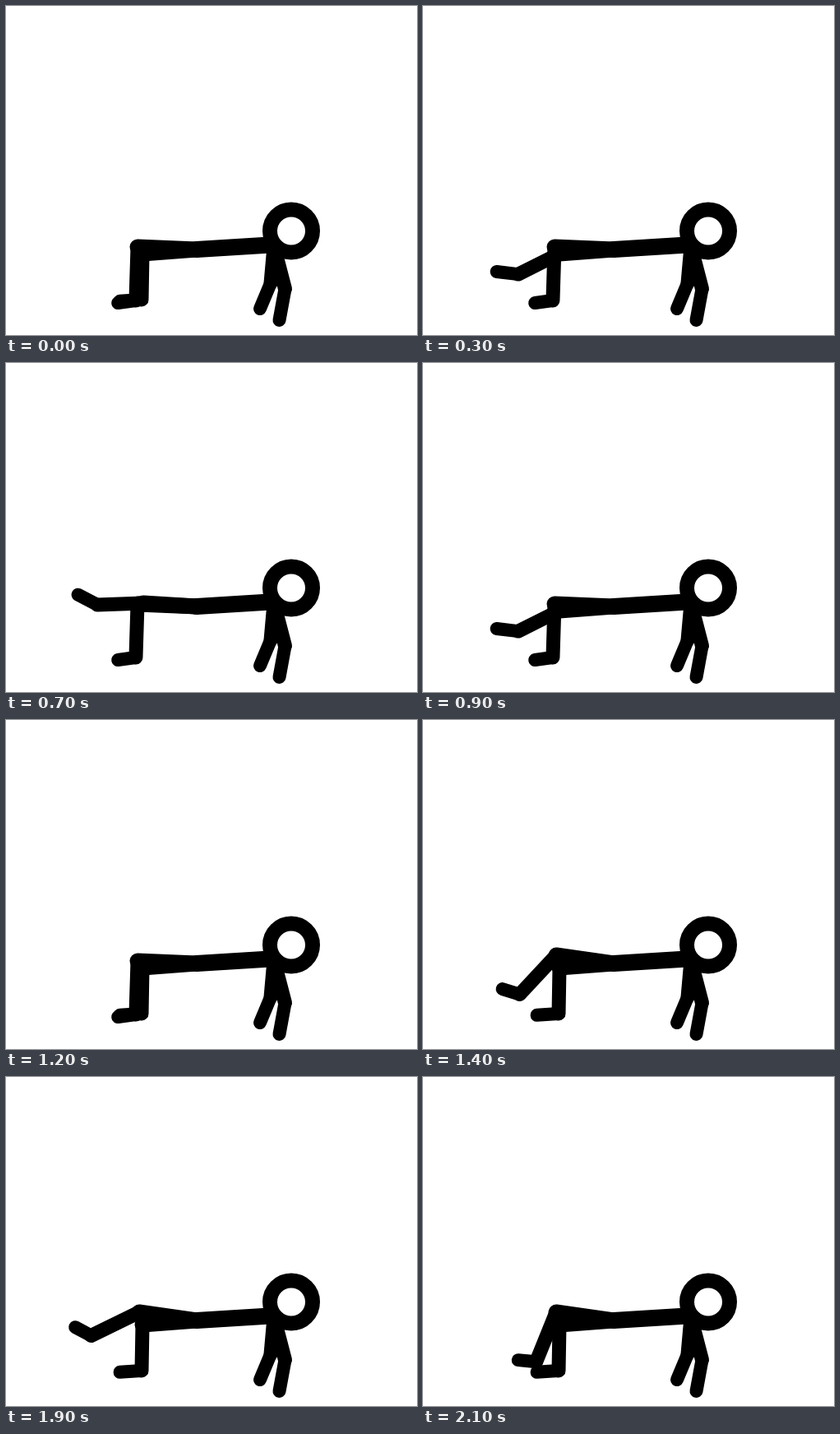
Animation of 500x400 px, one loop 2200 ms. Source, as an HTML page with a canvas:

```html
<!DOCTYPE html>
<html lang="en">
<head>
<meta charset="utf-8">
<title>Leg raises</title>
<style>
html, body { margin: 0; width: 100%; height: 100%; overflow: hidden; background: #fff; }
canvas { display: block; }
</style>
</head>
<body>
<canvas id="stage" width="500" height="400"></canvas>
<script>
const ctx = document.getElementById('stage').getContext('2d');
const STEP = 100, STEPS = 22;

// Angles in degrees, measured from straight down towards the left.
// Index 0 is the resting pose, the last one the top of the lift.
const near = {
  shinLen: 56, footLen: 26.5,
  knee: [[166, 301], [166, 301], [166, 301], [166, 301], [166, 296], [167, 292], [167, 292]],
  shin: [1, 22, 43, 63.4, 76, 88, 97],
  foot: [86, 89, 92, 96.6, 107, 117.5, 119]
};
const far = {
  shinLen: 65, footLen: 22,
  knee: [[160, 293], [162, 286], [162, 286], [162, 286], [162, 286], [162, 286]],
  shin: [1.8, 22, 43, 64, 85, 98],
  foot: [82, 95.5, 107, 118, 129.5, 127]
};
const hip = [232, 296];

function bone(a, b, width) {
  ctx.lineWidth = width;
  ctx.beginPath();
  ctx.moveTo(...a);
  ctx.lineTo(...b);
  ctx.stroke();
}

function swing([x, y], len, deg) {
  const a = deg * Math.PI / 180;
  return [x - len * Math.sin(a), y + len * Math.cos(a)];
}

function drawLeg(leg, lift) {
  const knee = leg.knee[lift];
  const ankle = swing(knee, leg.shinLen, leg.shin[lift]);
  const toe = swing(ankle, leg.footLen, leg.foot[lift]);
  bone(hip, knee, 19);
  bone(knee, ankle, 17);
  bone(ankle, toe, 16);
}

function drawArm(elbow, hand) {
  bone([326, 292], elbow, 17);
  bone(elbow, hand, 16);
}

function draw(step) {
  ctx.fillStyle = '#fff';
  ctx.fillRect(0, 0, 500, 400);
  ctx.strokeStyle = '#000';
  ctx.lineCap = 'round';

  // Near leg lifts for 12 steps, then the far leg for 10.
  drawLeg(near, Math.max(0, 6 - Math.abs(step - 6)));
  drawLeg(far, Math.max(0, 5 - Math.abs(step - 17)));

  bone(hip, [321, 290.5], 20);
  drawArm([322, 337], [309, 368]);
  drawArm([339.5, 344], [332.5, 382]);

  ctx.lineWidth = 18;
  ctx.beginPath();
  ctx.arc(347, 273.5, 26, 0, Math.PI * 2);
  ctx.fill();
  ctx.stroke();
}

const start = performance.now();
function tick() {
  draw(Math.floor((performance.now() - start) / STEP) % STEPS);
  requestAnimationFrame(tick);
}
tick();
</script>
</body>
</html>
```
